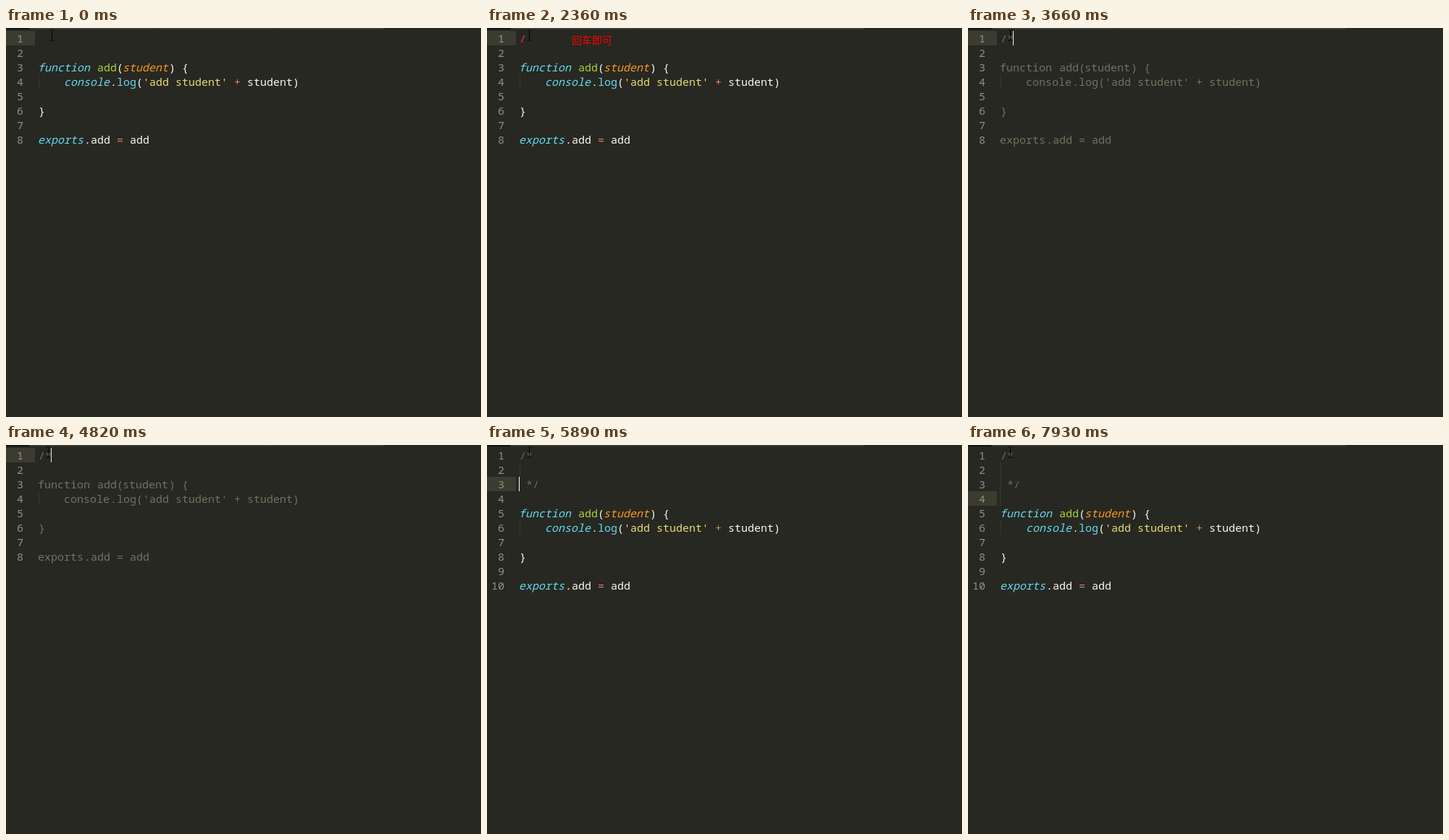
An HTML page that plays this animation: 656 px wide and 538 px high, repeating every 8000 ms.

```html
<!DOCTYPE html>
<html lang="zh">
<head>
<meta charset="utf-8">
<style>
  html, body { margin: 0; width: 100%; height: 100%; overflow: hidden; background: #272822; }
  svg { display: block; }
  text { font: 15px "Noto Sans Mono", "DejaVu Sans Mono", monospace; white-space: pre; fill: #f8f8f2; }
  .num { fill: #90908a; text-anchor: end; }
  .note { font: 14px "Noto Sans CJK SC", "Noto Sans CJK", sans-serif; fill: #f00; }
  .key { fill: #66d9ef; font-style: italic; }
  .arg { fill: #fd971f; font-style: italic; }
  .call { fill: #66d9ef; }
  .name { fill: #a9d236; }
  .str { fill: #e6db74; }
  .op { fill: #dc8a5c; }
  .slash { fill: #f92672; }
  .rem { fill: #696e58; }
  .muted tspan { fill: #75715e; font-style: normal; }
  .guide { stroke: #45463e; stroke-dasharray: 1 1; }
</style>
</head>
<body>
<svg width="656" height="538" viewBox="0 0 656 538">
  <rect width="656" height="538" fill="#272822"/>
  <path d="M32 0H523L520 2H34Z" fill="#3a3b36"/>
  <path d="M205 0h1v2h-1zM368 0h1v2h-1z" fill="#272822"/>
  <rect width="32" height="2" fill="#161713"/>
  <rect id="active" width="40" height="20" fill="#3c3b30"/>
  <g id="page"></g>
  <text id="note" class="note" x="117" y="22">回车即可</text>
  <rect id="caret" width="1" height="20" fill="#f8f8f0"/>
  <path id="pointer" d="M-3 2.5H-1L0 3.5L1 2.5H3M0 3.5V16.5M-3 17.5H-1L0 16.5L1 17.5H3" fill="none" stroke="#050505"/>
</svg>
<script>
const LOOP = 8000, ROW = 20, COL = 9, LEFT = 45;
const $ = id => document.getElementById(id);
const ramp = (t, from, to) => Math.min(1, Math.max(0, (t - from) / (to - from)));
const rowTop = row => row * ROW - 16;

// Each token is [class, text].
const code = [
  [["key", "function"], ["", " "], ["name", "add"], ["", "("], ["arg", "student"], ["", ") {"]],
  [["", "    "], ["key", "console"], ["", "."], ["call", "log"], ["", "("], ["str", "'add student'"],
   ["", " "], ["op", "+"], ["", " student)"]],
  [], [["", "}"]], [],
  [["key", "exports"], ["", ".add "], ["op", "="], ["", " add"]]
];
const opening = [["rem", "/*"]];
const closing = [["rem", " */"]];
const blank = { lines: [[], [], ...code] };
const slash = { lines: [[["slash", "/"]], [], ...code] };
const muted = { lines: [opening, [], ...code], style: "muted" };
const block = { lines: [opening, [], closing, [], ...code], blockRows: [2, 3] };

const keyPresses = [
  { time: 300, page: blank, row: 1, col: 0 },
  { time: 1800, page: slash, row: 1, col: 1 },
  { time: 3660, page: muted, row: 1, col: 2 },
  { time: 4970, page: block, row: 2, col: 0 },
  { time: 5890, page: block, row: 3, col: 0 },
  { time: 6210, page: block, row: 4, col: 0 }
];

// The caret rests after a key press, fades out, stays hidden and fades in again.
function caretOpacity(sincePress) {
  const period = 1200;
  const phase = (sincePress + period) % period;
  return 1 - ramp(phase, 330, 540) + ramp(phase, 1010, 1170);
}

function lineMarkup(tokens) {
  let col = 0;
  return tokens.map(([type, text]) => {
    const slant = type === "key" || type === "arg" ? 1 : 0;
    const x = LEFT + col * COL - slant;
    col += text.length;
    return `<tspan class="${type}" x="${x}">${text}</tspan>`;
  }).join("");
}

function pageMarkup({ lines, style = "", blockRows = [] }) {
  const bodyRow = lines.indexOf(code[1]) + 1;
  const guides = [...blockRows, bodyRow].map(row =>
    `<path class="guide" d="M${LEFT + .5} ${rowTop(row)}v${ROW}"/>`);
  const rows = lines.map((tokens, i) => {
    const y = (i + 1) * ROW;
    return `<text class="num" x="24" y="${y}">${i + 1}</text>` +
      `<text class="${style}" y="${y}">${lineMarkup(tokens)}</text>`;
  });
  return guides.concat(rows).join("");
}

let shown;
function draw(t) {
  const press = keyPresses.findLast(({ time }) => time <= t) ?? keyPresses[0];
  const { page, row, col, time } = press;
  if (page !== shown) {
    $("page").innerHTML = pageMarkup(page);
    shown = page;
  }
  $("active").setAttribute("y", rowTop(row));
  $("caret").setAttribute("x", LEFT - 1 + col * COL);
  $("caret").setAttribute("y", rowTop(row));
  $("caret").setAttribute("opacity", caretOpacity(t - time));
  $("pointer").setAttribute("transform", `translate(${63.5 - 5 * ramp(t, 40, 230)} 0)`);
  $("note").setAttribute("visibility", t >= 1800 && t < 2900 ? "visible" : "hidden");
}

let start;
function tick(now) {
  start ??= now;
  draw((now - start) % LOOP);
  requestAnimationFrame(tick);
}
draw(0);
requestAnimationFrame(tick);
</script>
</body>
</html>
```
